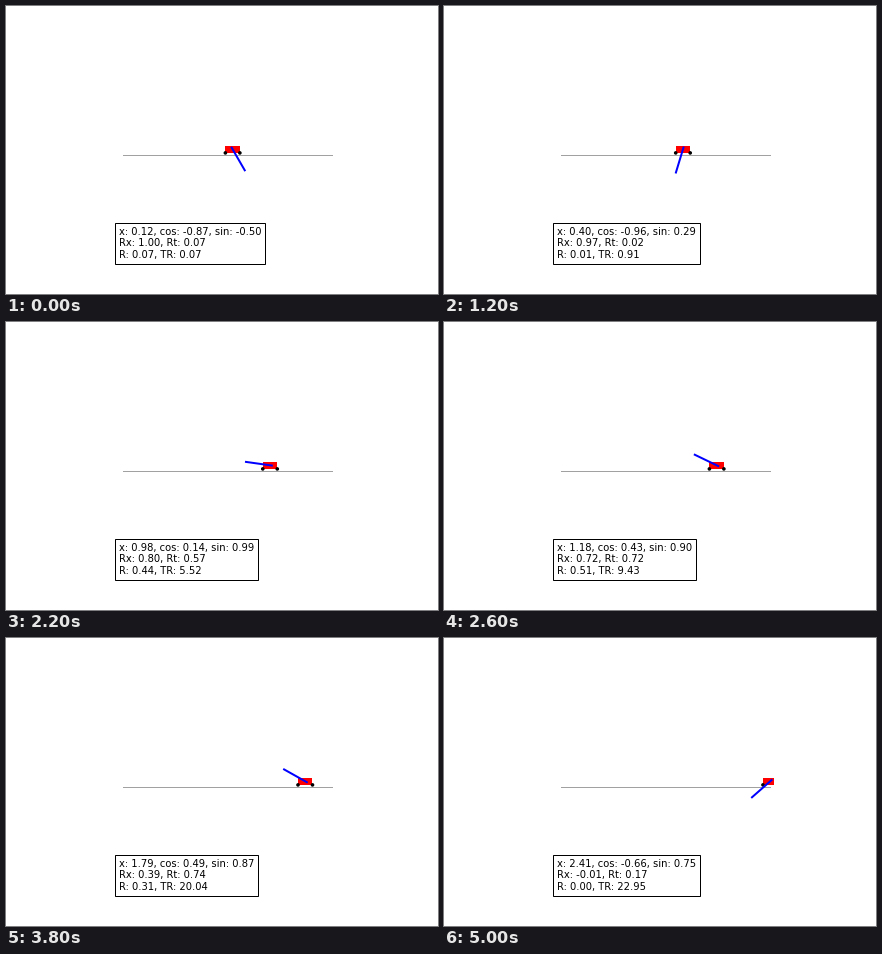
These frames come from a looping animation (432x288 px, 5050 ms). A matplotlib script:

```python
import numpy as np
import matplotlib.pyplot as plt
from matplotlib.animation import FuncAnimation
from matplotlib.patches import Circle, Rectangle

FRAMES, STEP_MS = 101, 50
LIMIT, TRACK = 2.5, 2.4
CART_W, CART_H = 1 / 3, 1 / 6
POLE_TAIL, POLE_TIP = -0.0417, 0.558

# Way points: step, cart position and speed, pole angle and rate (degrees), total reward
STEPS = np.array([0, 14, 34, 44, 60, 76, 100])
POS = [0.12, 0.19, 0.70, 0.98, 1.37, 1.79, 2.41]
SPEED = [0, 0.013, 0.0295, 0.026, 0.0245, 0.0265, 0.0255]
ANGLE = [210, 198.5, 116.8, 82, 55, 60.7, 131.3]
RATE = [0, -2.0, -4.2, -2.78, -0.65, 1.36, 4.5]
TOTAL = [0.07, 0.82, 1.99, 5.52, 13.50, 20.04, 22.95]


def hermite(t, knots, values, slopes):
    """Cubic through the knots with the given slopes."""
    values, slopes = np.array(values, float), np.array(slopes, float)
    i = np.clip(np.searchsorted(knots, t, side="right") - 1, 0, len(knots) - 2)
    h = knots[i + 1] - knots[i]
    s = (t - knots[i]) / h
    blend = s * s * (3 - 2 * s)
    return (values[i] * (1 - blend) + values[i + 1] * blend
            + h * slopes[i] * s * (1 - s) ** 2
            - h * slopes[i + 1] * s * s * (1 - s))


def running_total(reward):
    """Accumulate the reward, meeting the known total at each way point."""
    total = np.full(FRAMES, TOTAL[0])
    for k in range(len(STEPS) - 1):
        a, b = STEPS[k], STEPS[k + 1]
        part = np.cumsum(reward[a + 1:b + 1])
        total[a + 1:b + 1] = TOTAL[k] + (TOTAL[k + 1] - TOTAL[k]) * part / part[-1]
    return total


t = np.arange(FRAMES)
x = hermite(t, STEPS, POS, SPEED)
theta = np.radians(hermite(t, STEPS, ANGLE, RATE))
cos, sin = np.cos(theta), np.sin(theta)
rx = np.cos(x / TRACK * np.pi / 2)
rt = (cos + 1) / 2
gain = rx * rt
reward = np.concatenate((gain[:1], gain[:-1]))  # reward lags one step
total = running_total(reward)

plt.rcParams["font.family"] = "DejaVu Sans"
fig = plt.figure(figsize=(6, 4), dpi=72, facecolor="white")
ax = fig.add_axes([0.125, 0.125, 0.775, 0.755])
ax.set_xlim(-LIMIT, LIMIT)
ax.set_ylim(-LIMIT, LIMIT)
ax.set_aspect("equal")
ax.axis("off")

ax.plot([-TRACK, TRACK], [-0.75 * CART_H] * 2, color="0.63", lw=1, zorder=0.5)
cart = ax.add_patch(Rectangle((0, -CART_H / 2), CART_W, CART_H, fc="red", ec="none"))
wheels = [ax.add_patch(Circle((0, -CART_H / 2), CART_H / 4, fc="black", ec="none", zorder=1.5))
          for _ in range(2)]
pole, = ax.plot([], [], color="blue", lw=2)
label = ax.text(-LIMIT, -LIMIT, "", fontsize=10, color="black",
                bbox=dict(facecolor="white", edgecolor="black"))


def draw(i):
    cart.set_x(x[i] - CART_W / 2)
    for wheel, side in zip(wheels, (-1, 1)):
        wheel.center = (x[i] + side * CART_W / 2, -CART_H / 2)
    ends = np.array([POLE_TAIL, POLE_TIP])
    pole.set_data(x[i] - ends * sin[i], ends * cos[i])
    label.set_text(f"x: {x[i]:.2f}, cos: {cos[i]:.2f}, sin: {sin[i]:.2f}\n"
                   f"Rx: {rx[i]:.2f}, Rt: {rt[i]:.2f}\n"
                   f"R: {reward[i]:.2f}, TR: {total[i]:.2f}")
    return [cart, *wheels, pole, label]


anim = FuncAnimation(fig, draw, frames=FRAMES, interval=STEP_MS,
                     init_func=lambda: draw(0), repeat=True, repeat_delay=0)
plt.show()
```
